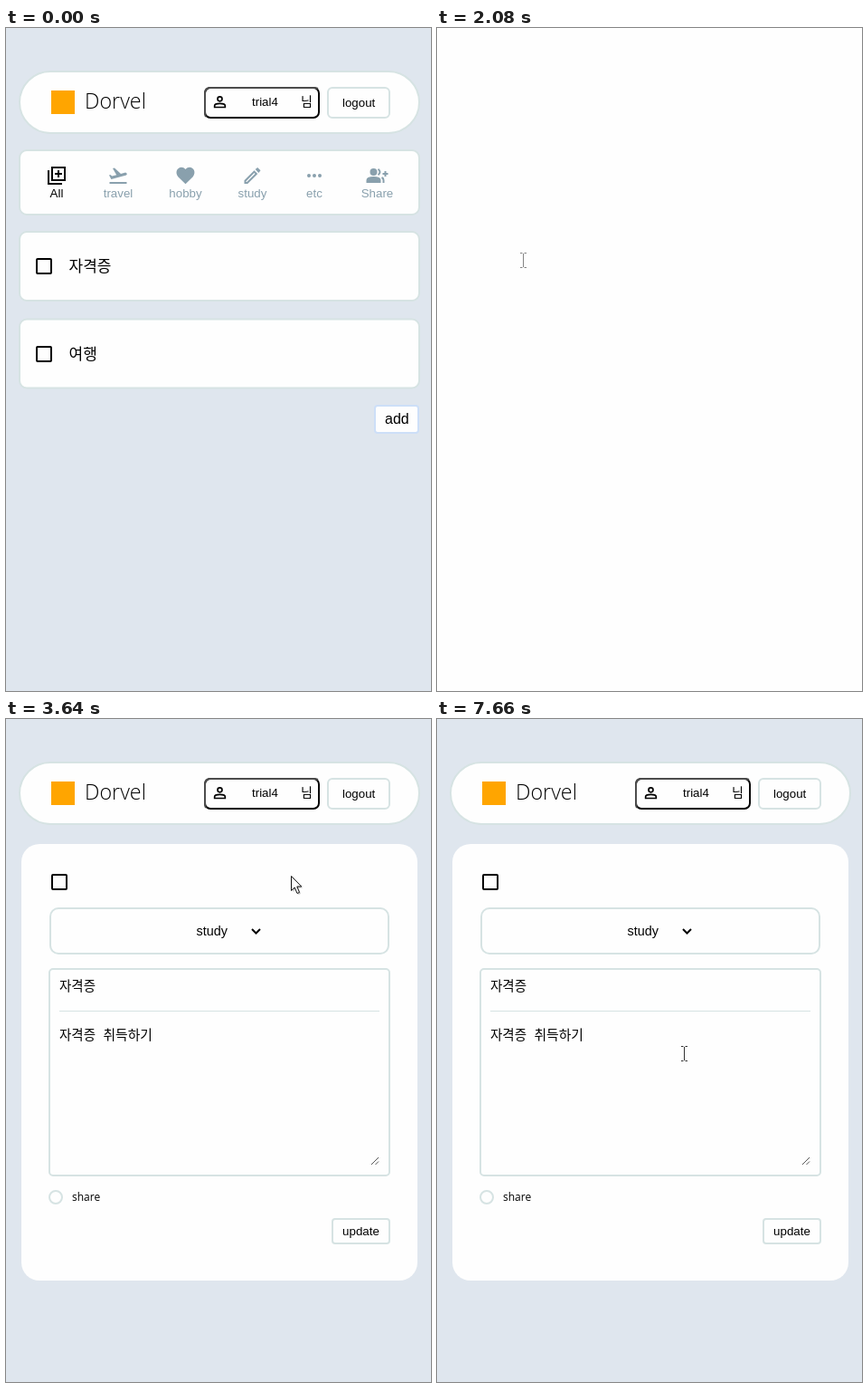
Recreate the animation shown at these times as an HTML page. Size 470 px wide and 732 px high, loop 8000 ms.

```html
<!DOCTYPE html>
<html lang="ko">
<head>
<meta charset="utf-8">
<style>
  html, body { margin: 0; width: 470px; height: 732px; overflow: hidden; background: #fefefe; }
  svg { display: block; }
  text { font: 13.33px "Liberation Sans", Arial, sans-serif; white-space: pre; }
  .ko { font-family: "Noto Sans CJK KR", "Noto Sans CJK", sans-serif; font-weight: 300; }
  .ui { font-family: "Open Sans", "Noto Sans", sans-serif; }
  .light { font-weight: 300; }
  .bold { font-weight: 700; }
  .mid { text-anchor: middle; }
</style>
</head>
<body>
<svg id="stage" width="470" height="732" viewBox="0 0 470 732"></svg>
<script>
const LINE = '#d6e3e3', GREY = '#89a0ad', WHITE = '#fefefe';

// Box given by its outer edges
function box(x0, y0, x1, y1, r, w = 2, stroke = LINE, extra = '') {
  return `<rect x="${x0 + w / 2}" y="${y0 + w / 2}" width="${x1 - x0 - w}" height="${y1 - y0 - w}"
    rx="${Math.max(0, r - w / 2)}" fill="${WHITE}" stroke="${stroke}" stroke-width="${w}" ${extra}/>`;
}
const text = (x, y, s, size = 13.33, cls = '', fill = '#000') =>
  `<text x="${x}" y="${y}" class="${cls}" fill="${fill}" style="font-size:${size}px">${s}</text>`;
const check = (x, y) => box(x, y, x + 18, y + 18, 2, 2, '#000');
const button = (x0, y0, x1, y1, label, extra) =>
  box(x0, y0, x1, y1, 4, 2, LINE, extra) + text((x0 + x1) / 2, (y0 + y1) / 2 + 4.5, label, 13.33, 'mid');
const group = (id, ...parts) => `<g id="${id}">${parts.join('')}</g>`;
const disc = (x, y, r) => `M${x - r} ${y}a${r} ${r} 0 1 0 ${2 * r} 0a${r} ${r} 0 1 0 ${-2 * r} 0`;

// An icon has a filled part and a stroked part, on a 24 px grid
const icon = (x, y, [solid, line], colour, k = 1) =>
  `<g transform="translate(${x} ${y}) scale(${k})"><path d="${solid}" fill="${colour}"/>
    <path d="${line}" fill="none" stroke="${colour}" stroke-width="2"/></g>`;

const PERSON = ['', disc(12, 8, 3) + 'M5 19V17Q5 14 12 14T19 17V19Z'];
const TABS = [
  ['All', 56, '', 'M7 3H21V17H7ZM3 6V21H18M14 6V14M10 10H18'],
  ['travel', 124, 'M2 11.4L3.3 11 5.3 12.6 10.2 11.2 6 4 8 3.6 15 10 20.2 8.6 22 10 21 11.5 4.4 15.9Z', 'M2.5 20H21.5'],
  ['hobby', 198.5, 'M12 21.3L4 13.500C-2 6 7 -1 12 5.100 17 -1 26 6 20 13.500Z', ''],
  ['study', 272.5, 'M15.200 5.100L17.700 2.900 21 6.300 18.900 8.900Z', 'M4 20V17.700L14 7.600 16.400 10 6.300 20Z'],
  ['etc', 341, [6, 12, 18].map(x => disc(x, 12, 2)).join(''), ''],
  ['Share', 410.5, disc(8, 8, 4) + 'M0 20V17Q0 13 8 13T16 17V20Z', 'M13 4.800Q17 8 13 11.200M17 14Q19 15 19 17V20M21 7V13M18 10H24']
];

const header = group('header',
  '<rect width="470" height="732" fill="#dfe6ee"/>',
  box(14, 47, 458, 117, 35),
  '<rect x="50" y="69" width="26" height="26" fill="#ffa500"/>',
  text(87, 89, 'Dorvel', 23.3, 'ui light'),
  box(219, 65, 347, 100, 7, 2, '#000'),
  '<path d="M221 98Q220 96 220 93V72Q220 66 226 66H340Q343 66 345 67" fill="none" stroke="#4c4c4c" stroke-width="2"/>',
  icon(226.5, 71.7, PERSON, '#000', .833),
  text(272, 86, 'trial4'), text(326, 85.5, '님', 14, 'ko'),
  box(355, 65, 425, 100, 6), text(372, 87, 'logout'));

const list = group('list',
  box(14, 134, 458, 207, 9),
  ...TABS.map(([label, x, ...shape], i) => {
    const colour = i ? GREY : '#000';
    return icon(x - 12, 151, shape, colour) + text(x, 187, label, 13.33, 'mid', colour);
  }),
  ...['자격증', '여행'].map((label, i) => {
    const y = 224 + i * 96.5;
    return box(14, y, 458, y + 78, 9) + check(33, Math.round(y + 30)) + text(69.5, y + 45, label, 17, 'ko');
  }),
  box(407, 416, 457, 448, 4, 2, '#cddff8'), text(419, 437, 'add', 16));

const detail = group('detail',
  box(17, 138, 455, 413, 20, 0), check(50, 171),
  group('updateBtn', button(305, 161, 360, 190, 'update')),
  button(375, 161, 425, 190, 'delete'),
  box(47, 207, 425, 271, 5, 1),
  text(58.5, 237.5, '자격증', 20, 'ko bold'),
  text(58.5, 257, '작성자 :', 13.7, 'ko bold'),
  text(109, 257, 'trial4', 12.4, 'ui bold'),
  box(47, 286, 425, 329, 5, 1), text(58.5, 314, '자격증 취득하기', 17.2, 'ko'),
  button(314, 344, 425, 373, 'Review Create'));

const edit = group('edit',
  box(17, 138, 455, 620, 20, 0), check(50, 171),
  box(48, 208, 424, 260, 10), text(210.5, 239, 'study', 14.4),
  '<path d="M272 232l4.500 4.500 4.500 -4.500" fill="none" stroke="#000" stroke-width="2"/>',
  box(47, 275, 425, 505, 5),
  `<path d="M59 322.500H413" stroke="${LINE}"/>`,
  ...[300, 354].map(y => text(59, y, '자격증', 14.5, 'ko')),
  text(107.5, 354, '취득하기', 14.8, 'ko'),
  '<path d="M404 492l8 -8M408.500 492l3.500 -3.500" stroke="#555"/>',
  `<circle cx="55" cy="528" r="7" fill="none" stroke="${LINE}" stroke-width="2"/>`,
  text(73, 532, 'share', 12, 'ui'),
  button(360, 551, 425, 580, 'update'));

const ARROW = 'M.5 .5V16.500L4.200 13 7 19.500 9.500 18.400 6.800 12H11.800Z';
const overlay =
  '<path id="caretTitle" d="M99.500 289v13" stroke="#000"/>' +
  '<path id="caretBody" d="M164.500 344v13" stroke="#000"/>' +
  group('pointer',
    '<circle id="press" cx="-2" cy="-1" r="15" fill="#ff0" opacity=".5"/>',
    '<path id="beam" d="M-3 -7.500H-.5M1.500 -7.500H4M.5 -7V8M-3 8.500H-.5M1.500 8.500H4" stroke="#333" fill="none"/>',
    group('arrow',
      `<path transform="translate(1.500 1.500)" opacity=".2" d="${ARROW}"/>`,
      `<path d="${ARROW}" fill="#fff" stroke="#111"/>`),
    `<path id="hand" d="M-1 2.500Q-1 .5 1 .5 3 .5 3 2.500V8Q5 6.500 6.500 8.500 8.500 7.500 9.500 9.500 12 9 12 11.500V16Q12 18 10.500 20V23.500H1V21L-5.500 14Q-6.500 12 -5 11.500 -3.500 11.300 -1 14ZM3 8V12.500M6.500 8.500V12.500M9.500 9.500V12.500"
      fill="#fff" stroke="#111" stroke-width="1.200"/>`);

stage.innerHTML = header + list + detail + edit + overlay;

// Pointer moves: begin, end, goal x, goal y, sideways bend of the curve
const ENTRY = [107, 103];
const MOVES = [
  [1140, 1480, 95, 256, -20],
  [2670, 3060, 315, 173, 50],
  [4380, 5120, 149, 295, -20],
  [5660, 5950, 222, 348, 0],
  [6320, 6720, 270, 371, 60],
  [7110, 7500, 273, 369, 0]
];
function pointerAt(t) {
  let [x, y] = ENTRY;
  for (const [begin, end, gx, gy, bend] of MOVES) {
    if (t < begin) break;
    const p = Math.min(1, (t - begin) / (end - begin));
    const k = p * p * (3 - 2 * p);
    const dx = gx - x, dy = gy - y;
    const side = 2 * k * (1 - k) * bend / Math.hypot(dx, dy);
    x += dx * k - dy * side;
    y += dy * k + dx * side;
  }
  return [Math.round(x), Math.round(y)];
}

function pointerKind(page, x, y, t) {
  if (page === 'blank') return 'beam';
  if (page === 'list') return t < 2020 && (y > 224 || y > 150 && y < 195) ? 'hand' : 'arrow';
  if (page === 'edit') return y > 275 ? 'beam' : 'arrow';
  if (x > 304 && y < 190) return 'hand';
  return x < 145 && y > 207 ? 'beam' : 'arrow';
}

const byId = id => document.getElementById(id);
const show = (id, on) => byId(id).setAttribute('display', on ? 'inline' : 'none');
const within = (t, begin, length) => t >= begin && t < begin + length;
const CLICKS = [1880, 3500, 5390, 6030], BLINK = 540;

function draw(t) {
  const page = t < 2080 ? 'list' : t < 2140 ? 'blank' : t < 3640 ? 'detail' : 'edit';
  const [x, y] = pointerAt(t);
  const kind = pointerKind(page, x, y, t);

  show('header', page !== 'blank');
  for (const id of ['list', 'detail', 'edit']) show(id, id === page);
  for (const id of ['beam', 'arrow', 'hand']) show(id, id === kind);
  show('pointer', t >= 1140);
  byId('pointer').setAttribute('transform', `translate(${x} ${y})`);

  const pressed = CLICKS.some(c => within(t, c, 70));
  show('press', pressed);
  byId('beam').setAttribute('opacity', page === 'blank' || pressed ? .6 : 1);

  // A caret starts lit at the click that sets it
  const [titleClick, bodyClick] = CLICKS.slice(2);
  const lit = click => t >= click && Math.floor((t - click) / BLINK) % 2 === 0;
  show('caretTitle', t < bodyClick && lit(titleClick));
  show('caretBody', lit(bodyClick));

  const hover = page === 'detail' && kind === 'hand';
  const [frame, label] = byId('updateBtn').children;
  frame.setAttribute('fill', hover ? '#8fb5f9' : WHITE);
  label.setAttribute('fill', hover ? '#fff' : '#000');
}

const start = performance.now();
function tick() {
  draw((performance.now() - start) % 8000);
  requestAnimationFrame(tick);
}
tick();
</script>
</body>
</html>
```
